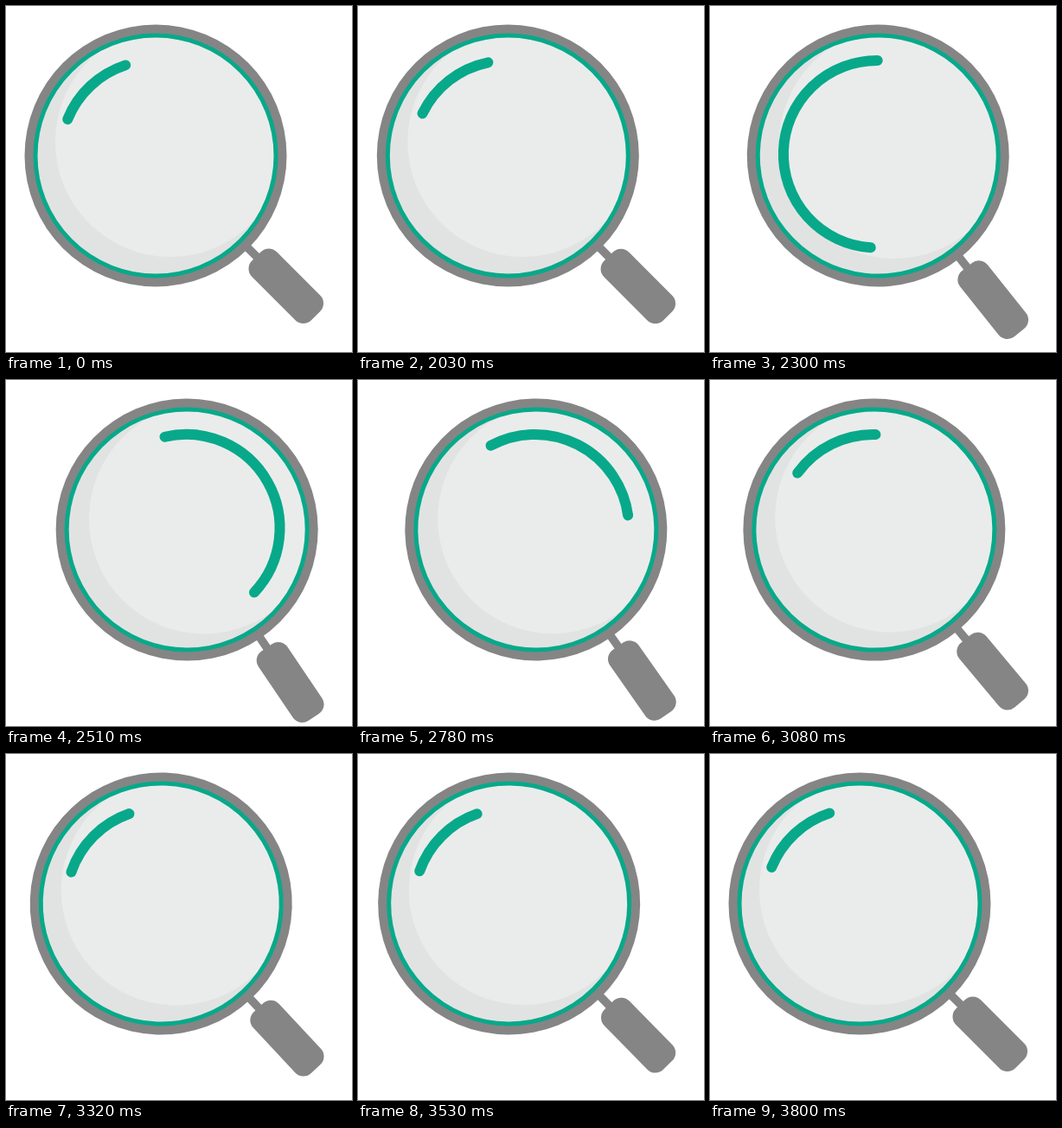
Write an HTML page that moves like this. It is 400 px wide and 400 px high and loops after 3.83 s.

```html
<!DOCTYPE html>
<html lang="en">
<head>
<meta charset="utf-8">
<title>Magnifying glass</title>
<style>
  html, body { margin: 0; height: 100%; overflow: hidden; background: #fff; }
  svg { display: block; width: 100vw; height: 100vh; }
</style>
</head>
<body>
<svg viewBox="0 0 400 400">
  <clipPath id="lens"><circle r="139"/></clipPath>
  <g id="glass">
    <g transform="rotate(45)" fill="#858585">
      <rect x="145" y="-4.8" width="25" height="9.6"/>
      <rect x="164.7" y="-20.3" width="97" height="40.6" rx="13"/>
    </g>
    <circle r="151.5" fill="#858585"/>
    <circle r="139" fill="#e1e3e2"/>
    <circle cx="17" cy="-16" r="133" fill="#eaeceb" clip-path="url(#lens)"/>
    <g fill="none" stroke="#07a98a">
      <circle r="139" stroke-width="5"/>
      <path id="shine" transform="translate(-1.3 -1.6)" stroke-width="12" stroke-linecap="round"/>
    </g>
  </g>
</svg>
<script>
const LOOP = 3830, REST = 2000, STEP = 30, R = 108.3;
const glass = document.getElementById('glass');
const shine = document.getElementById('shine');

// Same curve as CSS cubic-bezier(a, 0, b, 1), solved by bisection.
function ease(x, a, b) {
  let lo = 0, hi = 1, s;
  for (let i = 0; i < 24; i++) {
    s = (lo + hi) / 2;
    const w = 1 - s;
    if (3 * a * s * w * w + 3 * b * s * s * w + s ** 3 < x) lo = s; else hi = s;
  }
  return s * s * (3 - 2 * s);
}

// Part of a change `by` that is done at step n, when it runs from start to end.
function move(n, start, end, by, a = 1 / 3, b = 2 / 3) {
  const x = Math.min(1, Math.max(0, (n - start) / (end - start)));
  return by * ease(x, a, b);
}

function point(deg) {
  const a = deg * Math.PI / 180;
  return `${R * Math.cos(a)} ${R * Math.sin(a)}`;
}

function draw(now) {
  const n = Math.max(0, Math.floor((now % LOOP - REST) / STEP));
  const dx = move(n, 0, 18, 36.5) + move(n, 18, 60, -36.5, .39, .37);

  // Both ends of the highlight go round once, overshoot, fall back and settle.
  const tail = 201.9 + move(n, 0, 17.5, 405) + move(n, 17.5, 44, -50, .1, .9) + move(n, 44, 60, 5);
  const head = 252 + move(n, 0, 15, 502) + move(n, 15, 44, -145, .39, .5) + move(n, 44, 60, 3);

  glass.setAttribute('transform', `translate(${173 + dx} 173) rotate(${dx * .302})`);
  shine.setAttribute('d', `M${point(tail)}A${R} ${R} 0 ${head - tail > 180 ? 1 : 0} 1 ${point(head)}`);
  requestAnimationFrame(draw);
}
draw(0);
</script>
</body>
</html>
```
